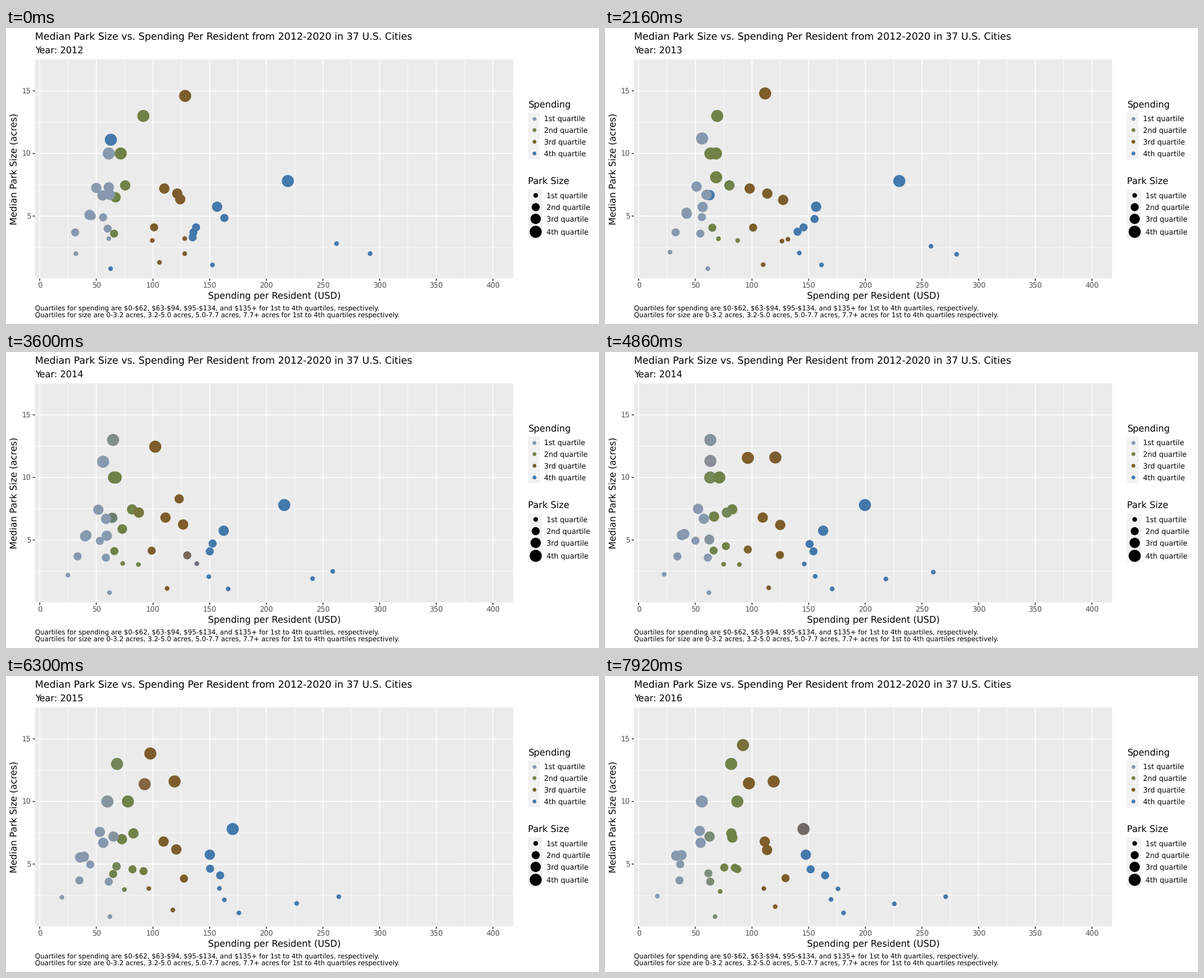
Recreate the animation shown at these times as a matplotlib script. Size 960 px wide and 480 px high, loop 8 s.

```python
import numpy as np
import matplotlib.pyplot as plt
from matplotlib.animation import FuncAnimation
from matplotlib.patches import Rectangle

W, H, DPI = 960, 480, 100
PT = 72 / DPI                       # points per pixel
LOOP, INTERVAL, STEP = 8000, 40, 180
YEARS = 5
STEPS_PER_YEAR = 99 / 8
QUARTILES = ["1st quartile", "2nd quartile", "3rd quartile", "4th quartile"]
COLORS = ["#8798AF", "#708247", "#7D5D2B", "#4479AC"]
DIAMETERS = 1 + 3 * np.sqrt(np.linspace(4, 36, 4))
DIAMETERS += 0.6

TO_XYZ = np.array([[0.4124, 0.3576, 0.1805],
                   [0.2126, 0.7152, 0.0722],
                   [0.0193, 0.1192, 0.9505]])
WHITE = TO_XYZ.sum(axis=1)
TO_LAB = np.array([[0, 116, 0], [500, -500, 0], [0, 200, -200]])


def rgb_to_lab(rgb):
    linear = np.where(rgb > 0.04045, ((rgb + 0.055) / 1.055) ** 2.4, rgb / 12.92)
    return np.cbrt(linear @ TO_XYZ.T / WHITE) @ TO_LAB.T - [16, 0, 0]


def lab_to_rgb(lab):
    xyz = ((lab + [16, 0, 0]) @ np.linalg.inv(TO_LAB).T) ** 3 * WHITE
    linear = np.clip(xyz @ np.linalg.inv(TO_XYZ).T, 0, 1)
    return np.where(linear > 0.0031308,
                    1.055 * linear ** (1 / 2.4) - 0.055, 12.92 * linear)


def px(x):
    return 54.5 + 1.8345 * x


def py(y):
    return 406.5 - 20.3 * y


def trend(*keys):
    """Yearly values of the smooth curve through evenly spaced key values."""
    at = np.linspace(0, YEARS - 1, len(keys))
    curve = np.polyfit(at, keys, len(keys) - 1)
    return np.round(np.polyval(curve, np.arange(YEARS)), 2)


def spending_quartile(x):
    # Values that fall between two bands end up in the last class
    return np.select([x <= 62, (x >= 63) & (x <= 94), (x >= 95) & (x <= 134)],
                     [0, 1, 2], 3)


def size_quartile(y):
    return np.searchsorted([3.2, 5.0, 7.7], y)


# Spending and median park size of each city
cities = [
    (trend(128.4, 111.6, 96, 98, 87), trend(14.6, 14.8, 11, 14.4, 14.6)),
    (trend(91.5, 62, 92), trend(13)),
    (trend(62.8, 56, 56, 100, 95), trend(11.1, 11.5)),
    (trend(71.5, 64, 53), trend(10)),
    (trend(61, 69.5, 93.5), trend(10)),
    (trend(50, 54.4), trend(7.25, 7.7)),
    (trend(61, 90.5), trend(7.3, 8.1, 4.5, 4.6, 4.6)),
    (trend(55.5, 61, 81), trend(6.65, 5.1, 4.7)),
    (trend(67, 65, 90), trend(6.5, 7.2)),
    (trend(62, 53.7), trend(6.7)),
    (trend(75.5, 82.5, 81), trend(7.45)),
    (trend(44, 37), trend(5.1, 5.8)),
    (trend(46, 31.5), trend(5, 5.75)),
    (trend(56, 51.5, 31), trend(4.9, 5)),
    (trend(60, 66.5, 59), trend(4, 4.3)),
    (trend(65.7, 54.4, 61, 61, 65), trend(3.6)),
    (trend(61, 75, 69.5), trend(3.2, 3.1, 2.7)),
    (trend(31.3, 36.6), trend(3.7)),
    (trend(32, 14.5), trend(2, 2.5)),
    (trend(62.6, 61, 62, 62, 72), trend(0.8)),
    (trend(110, 98, 81, 62, 63), trend(7.2)),
    (trend(121.4, 109.5, 113), trend(6.8)),
    (trend(124, 126, 108), trend(6.35, 6.1)),
    (trend(101, 97.5, 80), trend(4.1, 4.2, 4.9)),
    (trend(99.4, 87, 121), trend(3.05)),
    (trend(128, 143, 188), trend(3.2, 3)),
    (trend(128, 154, 174), trend(2, 2.2)),
    (trend(105.7, 122.4), trend(1.3, 1.15, 1.8)),
    (trend(135, 121, 119.5), trend(3.3, 3, 11.6, 11.6, 11.6)),
    (trend(135.7, 140.2, 124, 128, 131), trend(3.7, 3.9)),
    (trend(138, 168), trend(4.1)),
    (trend(156.6, 156.6, 166, 147, 148), trend(5.75)),
    (trend(163, 151, 153), trend(4.85, 4.55)),
    (trend(152.5, 169.5, 184), trend(1.1)),
    (trend(219, 230, 207, 163, 130.4), trend(7.8)),
    (trend(262, 259, 276), trend(2.8, 2.45, 2.4)),
    (trend(291.6, 280.6, 216, 229, 222.7), trend(2, 1.8)),
]

xs, ys = np.array(cities).transpose(1, 2, 0)
points = np.stack([px(xs), py(ys)], axis=-1)
diameters = DIAMETERS[size_quartile(ys)]
palette = np.array([[int(c[i:i + 2], 16) / 255 for i in (1, 3, 5)] for c in COLORS])
labs = rgb_to_lab(palette)[spending_quartile(xs)]
keys = np.round(np.arange(YEARS) * STEPS_PER_YEAR)   # step that reaches each year

plt.rcParams.update({"font.family": "DejaVu Sans", "text.hinting": "none"})
fig = plt.figure(figsize=(W / DPI, H / DPI), dpi=DPI, facecolor="white")
ax = fig.add_axes([0, 0, 1, 1])
ax.set(xlim=(0, W), ylim=(H, 0))
ax.axis("off")

LEFT, TOP, RIGHT, BOTTOM = 47, 51.2, 821, 406.3
TITLE, HEADING, LABEL, CAPTION = 15.87, 14.72, 11.65, 10.7


def text(x, y, s, size, color="black", **kw):
    return ax.text(x, y, s, fontsize=size * PT, color=color, va="baseline",
                   parse_math=False, **kw)


def box(x, y, w, h, color):
    ax.add_patch(Rectangle((x, y), w, h, color=color, lw=0, zorder=0))


def line(x, y, color, width):
    ax.plot(x, y, color=color, lw=width * PT, solid_capstyle="butt",
            snap=False, zorder=1)


def dots(x, y, diameter, color):
    return ax.scatter(x, y, s=(np.asarray(diameter) * PT) ** 2, c=color,
                      linewidths=0, zorder=3)


def grid(x_values, y_values, width):
    for x in x_values:
        line([px(x)] * 2, [TOP, BOTTOM], "white", width)
    for y in y_values:
        line([LEFT, RIGHT], [py(y)] * 2, "white", width)


box(LEFT, TOP, RIGHT - LEFT, BOTTOM - TOP, "#EBEBEB")
grid(range(25, 400, 50), np.arange(2.5, 15, 5), 0.71)
grid(range(0, 401, 50), range(5, 16, 5), 1.42)
for x in range(0, 401, 50):
    line([px(x)] * 2, [BOTTOM, BOTTOM + 3.7], "#333333", 1.42)
    text(px(x), 422, str(x), LABEL, "#4D4D4D", ha="center")
for y in range(5, 16, 5):
    line([LEFT - 3.7, LEFT], [py(y)] * 2, "#333333", 1.42)
    text(40.5, py(y) + 4.3, str(y), LABEL, "#4D4D4D", ha="right")

text(47, 19, "Median Park Size vs. Spending Per Resident "
     "from 2012-2020 in 37 U.S. Cities", TITLE)
year_label = text(47, 41, "", HEADING)
text(434.3, 439, "Spending per Resident (USD)", HEADING, ha="center")
text(18.5, 228.7, "Median Park Size (acres)", HEADING, ha="center",
     rotation=90, rotation_mode="anchor")
text(47, 458, "Quartiles for spending are $0-$62, $63-$94, $95-$134, "
     "and $135+ for 1st to 4th quartiles, respectively.", CAPTION)
text(47, 469, "Quartiles for size are 0-3.2 acres, 3.2-5.0 acres, 5.0-7.7 acres, "
     "7.7+ acres for 1st to 4th quartiles respectively.", CAPTION)


def legend(title, y, key_width, key_heights, dot_sizes, colors):
    text(845, y, title, HEADING)
    y += 8.7
    box(845, y, key_width, sum(key_heights), "#F2F2F2")
    for name, height, size, color in zip(QUARTILES, key_heights, dot_sizes, colors):
        middle = y + height / 2
        dots(845.2 + key_width / 2, middle, size, color)
        text(852.3 + key_width, middle + 4.4, name, LABEL)
        y += height


legend("Spending", 128.4, 18.9, [18.9] * 4, [6.2] * 4, COLORS)
legend("Park Size", 252.9, 22.7, [18.9] * 3 + [22.7], DIAMETERS, ["black"] * 4)

city_dots = dots(points[0, :, 0], points[0, :, 1], diameters[0], "black")


def update(frame):
    step = (frame * INTERVAL + INTERVAL - 1) // STEP
    k = np.searchsorted(keys, step, side="right") - 1
    t = (step - keys[k]) / (keys[k + 1] - keys[k])

    def blend(values):
        return values[k] + (values[k + 1] - values[k]) * t

    city_dots.set_offsets(blend(points))
    city_dots.set_sizes((blend(diameters) * PT) ** 2)
    city_dots.set_facecolors(lab_to_rgb(blend(labs)))
    year_label.set_text(f"Year: {round(2012 + step / STEPS_PER_YEAR)}")
    return city_dots, year_label


anim = FuncAnimation(fig, update, frames=LOOP // INTERVAL, interval=INTERVAL,
                     init_func=lambda: update(0), repeat=True, repeat_delay=0)
plt.show()
```
